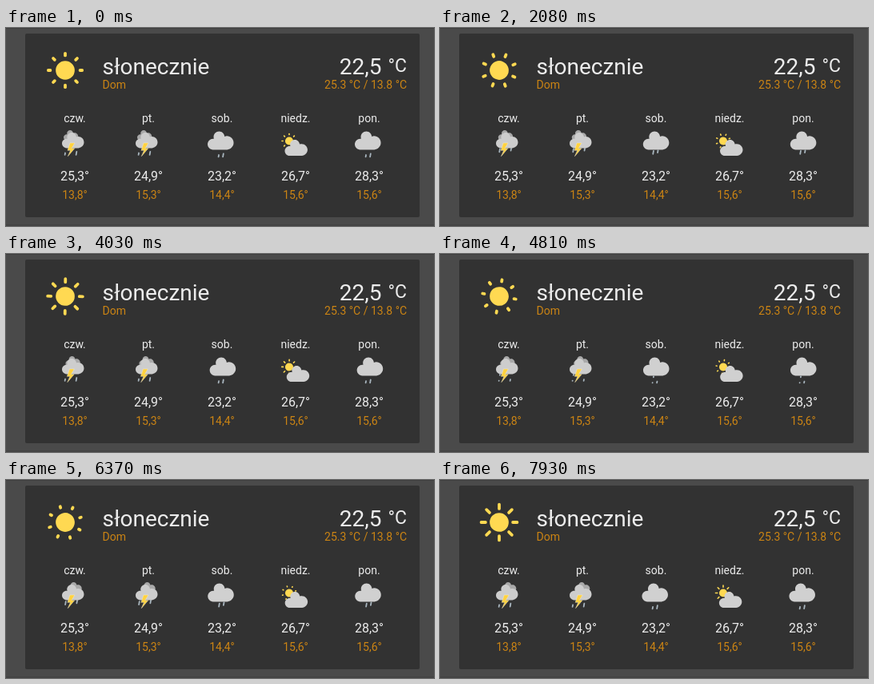
An HTML page for the animation above (8 s loop, 535 by 248 pixels).

```html
<!DOCTYPE html>
<html lang="pl">
<head>
<meta charset="utf-8">
<style>
html, body { margin: 0; width: 100%; height: 100%; overflow: hidden; background: #4a4a4a; }
svg { display: block; width: 535px; height: 248px; font: 14px Roboto, sans-serif; fill: #ececec; }
.low { fill: #cb8414; }
.mid { text-anchor: middle; }
.end { text-anchor: end; }
.sun { fill: #ffd952; stroke: #ffd952; stroke-width: 2; stroke-linecap: round; }
.drop { stroke: #a9b6bf; stroke-width: 1.8; stroke-linecap: round; }
</style>
</head>
<body>
<svg id="stage" viewBox="0 0 535 248">
  <defs>
    <path id="cloud" d="M31.6 13.9c0-4.6-3.7-8.2-8.2-8.2c-1 0-1.9.2-2.8.5c-.3-3.4-3.1-6.2-6.6-6.2c-3.7 0-6.7 3-6.7 6.7c0 .8.2 1.6.4 2.3c-.3-.1-.7-.1-1-.1c-3.7 0-6.7 3-6.7 6.7c0 3.6 2.9 6.6 6.5 6.7h17.2c4.4-.5 7.9-4 7.9-8.4z"/>
    <path id="bolt" d="M3.2 0h6.2l-4.1 7.2h3.9L.4 17.5l3.4-7.7H0z" fill="#ffd23f" stroke="#f3ead0" stroke-width=".5"/>
  </defs>
  <rect width="535" height="1" fill="#3e3e3e"/>
  <rect y="246" width="535" height="2" fill="#444"/>
  <rect x="24" y="7" width="493" height="230" rx="2" fill="#323232"/>
  <text x="120.5" y="58" font-size="28">słonecznie</text>
  <text x="120.5" y="76" class="low">Dom</text>
  <text x="469.5" y="58" font-size="28" class="end">22,5</text>
  <text x="501" y="55" font-size="23" class="end">°C</text>
  <text x="501" y="76" class="low end">25.3 °C / 13.8 °C</text>
  <g id="days"></g>
  <g id="icons"></g>
</svg>
<script>
const LOOP = 8000, STEP = 130;
const days = [
  ['czw.', '25,3°', '13,8°', storm],
  ['pt.', '24,9°', '15,3°', storm],
  ['sob.', '23,2°', '14,4°', rain],
  ['niedz.', '26,7°', '15,6°', sunCloud],
  ['pon.', '28,3°', '15,6°', rain]
];
const dayX = i => 86 + 92 * i;
const wave = p => (1 - Math.cos(2 * Math.PI * p)) / 2;
const label = (x, y, text, size = 14, cls = '') =>
  `<text class="mid ${cls}" x="${x}" y="${y}" font-size="${size}">${text}</text>`;
const cloud = (x, y, scale, fill) =>
  `<use href="#cloud" fill="${fill}" transform="translate(${x} ${y}) scale(${scale})"/>`;

function sun(x, y, scale, t) {
  const phase = (t / 4680 + 0.279) % 1;
  const shrink = 1 - Math.abs(1 - 2 * phase);
  const start = 9 + 1.6 * shrink, end = 12 - 1.3 * shrink;
  let rays = '';
  for (let a = 0; a < 360; a += 45)
    rays += `<path d="M0 ${start}V${end}" transform="rotate(${a})"/>`;
  return `<g class="sun" transform="translate(${x} ${y}) scale(${scale}) rotate(${t * 0.01135})">
    <circle r="5.3"/>${rays}</g>`;
}

// Dashes of 4 in a cycle of 11 fall along a line of 8.
function drop(x, y, shift) {
  const d = shift % 11;
  const piece = (a, b) => b > a ? `<path class="drop" d="M0 ${a}V${b}"/>` : '';
  return `<g transform="translate(${x} ${y}) rotate(10)">` +
    piece(d, Math.min(8, d + 4)) + piece(0, d - 7) + '</g>';
}
const drops = (x, y, gap, t) =>
  drop(x, y, t * 0.00275 + 5.6) + drop(x + gap, y, t * 0.00275 + 4);

function storm(x, t) {
  const p = t % 2600 / 2600;
  const shake = p < 0.4 ? 0.4 * wave(p * 25) : -1.2 * wave((p - 0.4) / 0.6);
  return cloud(x - 14 + 5 * wave(t / 16400), 128, 0.58, '#a9a9a9') +
    drops(x - 11, 151, 14, t) +
    cloud(x - 16, 131, 0.87, '#cdcdcd') +
    `<use href="#bolt" transform="translate(${x - 9 + shake} 144) scale(.95)"/>`;
}

function rain(x, t) {
  return drops(x - 3, 153.5, 5.5, t) +
    cloud(x - 18 + 2.8 * wave(t / 7020), 129.5, 1.03, '#d0d0d0');
}

function sunCloud(x, t) {
  return sun(x - 8, 141.5, 0.8, t) +
    cloud(x - 13.5 + 2.4 * wave(t / 7020), 140, 0.9, '#d0d0d0');
}

document.getElementById('days').innerHTML = days.map(([name, high, low], i) =>
  label(dayX(i), 118, name) + label(dayX(i), 191, high, 16) +
  label(dayX(i), 214, low, 14, 'low')).join('');

const icons = document.getElementById('icons');
function draw() {
  const t = Math.floor(performance.now() % LOOP / STEP) * STEP;
  icons.innerHTML = sun(74, 53, 1.88, t) +
    days.map((day, i) => day[3](dayX(i), t)).join('');
  requestAnimationFrame(draw);
}
draw();
</script>
</body>
</html>
```
